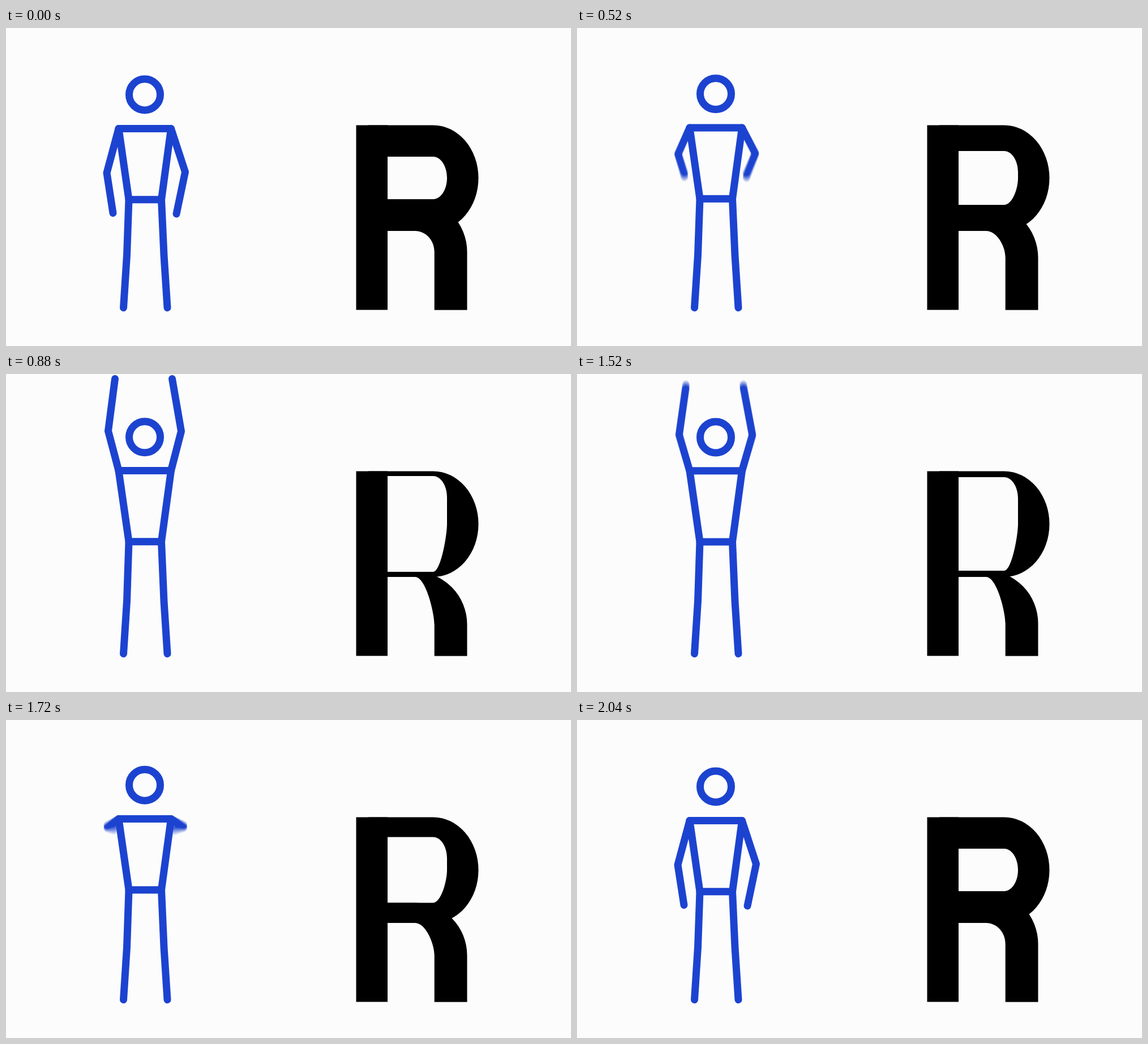
An HTML page with a canvas for the animation above (2200 ms loop, 998 by 561 pixels).

```html
<!DOCTYPE html>
<html lang="en">
<head>
<meta charset="utf-8">
<title>Stretching figure and letter</title>
<style>
  html, body { margin: 0; width: 100%; height: 100%; overflow: hidden; background: #fcfcfc; }
  canvas { display: block; width: 998px; height: 561px; }
</style>
</head>
<body>
<canvas id="stage" width="998" height="561"></canvas>
<script>
const W = 998, H = 561, PAPER = '#fcfcfc', BLUE = '#1c43d0';
const LOOP = 2200, STEP = 40, MOVE = 560, UP = 320, DOWN = 1480;
const SHUTTER = 20, SAMPLES = 12;

const ctx = document.getElementById('stage').getContext('2d');
const layer = document.createElement('canvas');
layer.width = 400;
layer.height = H;
const pen = layer.getContext('2d');

const mix = (a, b, p) => a + (b - a) * p;
const clamp = x => Math.min(1, Math.max(0, x));

// Cubic easing whose handles lie at (x1, 0) and (x2, 1)
function ease(x1, x2, x) {
  x = clamp(x);
  if (x === 0 || x === 1) return x;
  let lo = 0, hi = 1, s;
  for (let i = 0; i < 30; i++) {
    s = (lo + hi) / 2;
    const r = 1 - s;
    if (3 * s * r * r * x1 + 3 * s * s * r * x2 + s * s * s < x) lo = s; else hi = s;
  }
  return s * s * (3 - 2 * s);
}

// 0 = arms down and heavy letter, 1 = arms up and thin strokes
const stretch = t => t < DOWN
  ? ease(0.413, 0.796, (t - UP) / MOVE)
  : 1 - ease(0.167, 0.521, (t - DOWN) / MOVE);

const moving = t => (t > UP && t < UP + MOVE) || (t > DOWN && t < DOWN + MOVE);

function polyline(points, closed) {
  pen.beginPath();
  points.forEach(([x, y]) => pen.lineTo(x, y));
  if (closed) pen.closePath();
  pen.stroke();
}

// Joints as [x, y] at rest and [x, y] when stretched
const ARMS = [
  { elbow: [[178, 255.5], [180.5, 100.5]], wrist: [[189, 326.5], [192.5, 8.5]] },
  { elbow: [[316.5, 254], [309.5, 101]], wrist: [[301, 328], [293.5, 8.5]] }
];

function drawFigure(p) {
  const joint = ([a, b]) => [mix(a[0], b[0], p), mix(a[1], b[1], p)];
  const rise = 7 * p;
  const shoulders = [[199, 177.5 - rise], [291.5, 177.5 - rise]];
  const hips = [[217, 302.8 - rise], [274.5, 302.8 - rise]];

  pen.fillStyle = PAPER;
  pen.fillRect(0, 0, layer.width, H);
  pen.strokeStyle = BLUE;
  pen.lineWidth = 13;
  pen.lineCap = pen.lineJoin = 'round';

  pen.beginPath();
  pen.arc(245, 117.5 - 6.2 * p, 27.5, 0, 2 * Math.PI);
  pen.stroke();
  polyline([shoulders[0], shoulders[1], hips[1], hips[0]], true);
  polyline([hips[0], [213.5, 401], [207.5, 493.5]]);
  polyline([hips[1], [279, 401], [285, 493.5]]);
  ARMS.forEach((arm, i) => polyline([shoulders[i], joint(arm.elbow), joint(arm.wrist)]));
}

function drawLetter(p) {
  const d = 47 * p, top = 227 - d, bottom = 302 + d, knee = 395 + d;
  ctx.fillStyle = '#000';
  ctx.fillRect(618.5, 171.5, 55.5, 325.8);

  const bowl = new Path2D(`M640 171.5H754.5A80 93.2 0 0 1 754.5 358H640Z
    M674 ${top}H754.5C768 ${top} 779 ${top + 16.8} 779 ${264.5 - d}
    V264.5C779 285.2 768 ${bottom} 754.5 ${bottom}H674Z`);
  ctx.fill(bowl, 'evenodd');

  const leg = new Path2D(`M674 ${bottom}H722.5A92 93 0 0 1 814.5 ${knee}
    V497.5H756.7V${knee}C756.7 ${knee - 20.4} 741.5 358 722.5 358H674Z`);
  ctx.fill(leg);
}

function draw(t) {
  ctx.fillStyle = PAPER;
  ctx.fillRect(0, 0, W, H);
  const count = moving(t) ? SAMPLES : 1;
  for (let i = 0; i < count; i++) {
    const offset = ((i + 0.5) / count - 0.5) * SHUTTER;
    drawFigure(stretch(t + offset));
    ctx.globalAlpha = 1 / (i + 1);   // running average gives motion blur
    ctx.drawImage(layer, 0, 0);
  }
  ctx.globalAlpha = 1;
  drawLetter(stretch(t));
}

const start = performance.now();
let shown = -1;
function tick() {
  const t = Math.floor(((performance.now() - start) % LOOP) / STEP) * STEP;
  if (t !== shown) draw(shown = t);
  requestAnimationFrame(tick);
}
tick();
</script>
</body>
</html>
```
